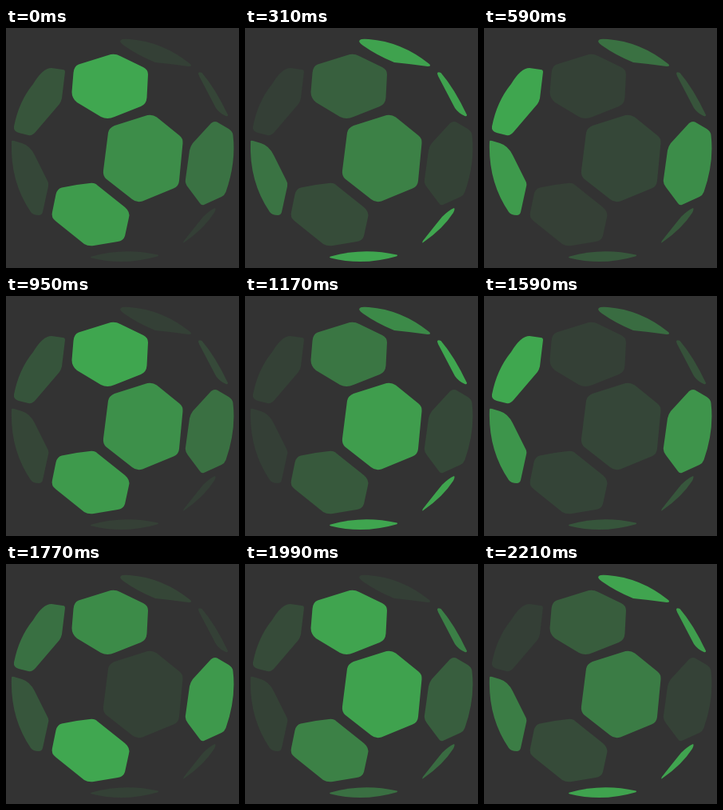
These frames come from a looping animation (292x300 px, 2310 ms). An HTML page:

```html
<!DOCTYPE html>
<html lang="en">
<head>
<meta charset="utf-8">
<title>Pulsing ball</title>
<style>
  html, body { margin: 0; width: 100%; height: 100%; overflow: hidden; background: #333; }
  svg { display: block; width: 292px; height: 300px; }
  path { fill: #40a850; opacity: .1; }
</style>
</head>
<body>
<!-- data-peak: time in ms at which the panel is brightest -->
<svg viewBox="0 0 292 300">
  <path data-peak="44" d="M91 45.500L128 34Q136 31 143 35L172 49Q178 52 178 58L176.500 87Q176 95 169 98L136 111Q127 115 119 111L89 93Q82.500 88 82.500 80L84.500 56Q85 48 91 45.500Z"/>
  <path data-peak="157" d="M136 122L174 110Q182.500 107 189 111.500L217.500 134.500Q222 138 221.500 144L217 191Q216.500 198 210 200.500L171 216.500Q164 219 158 214L126 189Q121 185 122 178L128 131Q129 125 136 122Z"/>
  <path data-peak="262" d="M241 57Q241 54 245.500 56Q262 75 278 108.500Q278.500 111 275.500 110Q268 107 263 100L242 60Z"/>
  <path data-peak="285" d="M107.500 285.500Q148 274 190.500 283.500Q192 284.500 189.500 285.500Q148 297.500 107.500 287.500Q104.500 286.500 107.500 285.500Z"/>
  <path data-peak="290" d="M262 225Q263.500 226 261 231Q248 251 224 267.500Q221 270 223 266Q238 247 247 236Q255 228 262 225Z"/>
  <path data-peak="390" d="M144 15Q146 13 155 14Q196 17 231 45Q234 48 229 48Q208 45 187 43Q165 34 148 22Q141 17 144 15Z"/>
  <path data-peak="510" d="M7 142Q7 140 10 141L20 144Q30 147 36 159L52 191Q54 194 53 198L46 230Q45 234 41 234Q34 234 31 230Q5 192 7 142Z"/>
  <path data-peak="625" d="M57 50L71 52Q74 52 74 55L70 88Q69 92 67 95L37 130Q33 135 28 134L16 131Q9 129 10 123Q16 92 34 70Q46 50 57 50Z"/>
  <path data-peak="745" d="M257 119Q262 115 267 119L279 126Q284 129 284.500 134Q288.500 168 275.500 205Q274 209 270 211L248 221Q245 222 243 219L228 199Q224 194 225 189L230 153Q231 148 234 144Z"/>
  <path data-peak="870" d="M70 199.500Q88 195.500 105 194Q111 193 115 197L149 224Q156 230 154 237L149 260Q147 266 140 267L110 272Q103 273 98 270L63 242Q56 237 58 230L62.500 208Q64 201 70 199.500Z"/>
</svg>
<script>
  const LOOP = 2310, PERIOD = 943, RISE = 0.3, DIM = 0.1;
  // The picture advances in steps: [first change, last change, count].
  const RUNS = [
    [70, 310, 6], [360, 590, 5], [680, 950, 6], [1020, 1170, 4],
    [1210, 1360, 4], [1390, 1710, 7], [1770, 2210, 10],
  ];
  const panels = [...document.querySelectorAll('path')];

  // Same curve as the CSS "ease" keyword.
  function ease(x) {
    const bezier = (s, a, b) => 3 * s * (1 - s) ** 2 * a + 3 * s * s * (1 - s) * b + s ** 3;
    let lo = 0, hi = 1;
    for (let i = 0; i < 20; i++) {
      const mid = (lo + hi) / 2;
      if (bezier(mid, 0.25, 0.25) < x) lo = mid; else hi = mid;
    }
    return bezier(lo, 0.1, 1);
  }

  function stepTime(t) {
    let held = 0;
    for (const [from, to, count] of RUNS) {
      if (t < from) break;
      const gap = (to - from) / (count - 1);
      held = from + gap * Math.min(count - 1, Math.floor((t - from) / gap + 1e-6));
    }
    return held;
  }

  function glow(t, peak) {
    const turn = (t - peak) / PERIOD + RISE;
    const p = turn - Math.floor(turn);
    const level = p < RISE ? ease(p / RISE) : 1 - ease((p - RISE) / (1 - RISE));
    return DIM + (1 - DIM) * level;
  }

  const start = performance.now();
  function draw() {
    const t = stepTime((performance.now() - start) % LOOP);
    for (const panel of panels) panel.style.opacity = glow(t, +panel.dataset.peak);
    requestAnimationFrame(draw);
  }
  draw();
</script>
</body>
</html>
```
